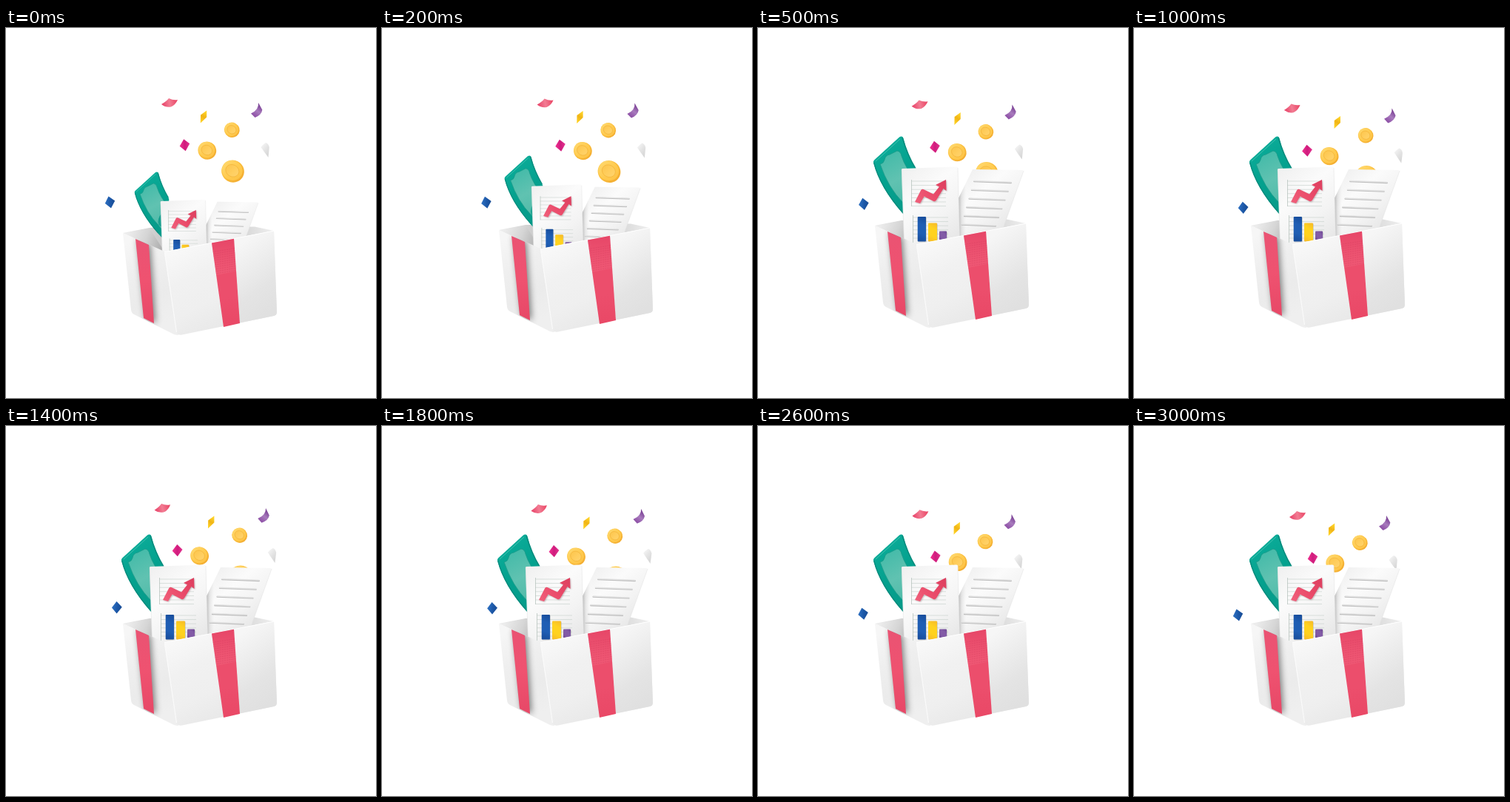
An HTML page with a canvas for the animation above (6100 ms loop, 500x500 px).

```html
<!DOCTYPE html>
<html lang="en">
<head>
<meta charset="utf-8">
<title>Gift box</title>
<style>
html, body { margin: 0; width: 100%; height: 100%; overflow: hidden; background: #fff; }
canvas { display: block; width: 100vw; height: 100vh; }
</style>
</head>
<body>
<canvas id="stage"></canvas>
<script>
const canvas = document.getElementById('stage');
const ctx = canvas.getContext('2d');
const ratio = window.devicePixelRatio || 1;
canvas.width = canvas.height = 500 * ratio;

const LOOP = 6100, STEP = 100, MOVE = 3000, HALF = 1500, POP = 500;

function grad(x0, y0, x1, y1, ...colors) {
  const g = ctx.createLinearGradient(x0, y0, x1, y1);
  colors.forEach((c, i) => g.addColorStop(i / (colors.length - 1), c));
  return g;
}

function fill(shape, style) {
  ctx.fillStyle = style;
  ctx.fill(new Path2D(shape));
}

function stroke(shape, style, width) {
  ctx.strokeStyle = style;
  ctx.lineWidth = width;
  ctx.stroke(new Path2D(shape));
}

function at(x, y, angle, draw) {
  ctx.save();
  ctx.translate(x, y);
  ctx.rotate(angle * Math.PI / 180);
  draw();
  ctx.restore();
}

function zoom(x, y, s, draw) {
  ctx.save();
  ctx.translate(x, y);
  ctx.scale(s, s);
  ctx.translate(-x, -y);
  draw();
  ctx.restore();
}

function within(shape, draw) {
  ctx.save();
  ctx.clip(new Path2D(shape));
  draw();
  ctx.restore();
}

function shadowed(color, blur, dx, dy, draw) {
  ctx.save();
  ctx.shadowColor = color;
  ctx.shadowBlur = blur * ratio;
  ctx.shadowOffsetX = dx * ratio;
  ctx.shadowOffsetY = dy * ratio;
  draw();
  ctx.restore();
}

function disc(x, y, rx, ry, style, line) {
  ctx.beginPath();
  ctx.ellipse(x, y, rx, ry, 0.5, 0, Math.PI * 2);
  ctx.fillStyle = style;
  ctx.fill();
  if (line) {
    ctx.strokeStyle = line;
    ctx.lineWidth = 0.8;
    ctx.stroke();
  }
}

function coin(r) {
  disc(0, 0, r, r * 0.96, grad(-r, -r, r, r, '#ffd25a', '#fabd3c', '#f0a62c'));
  disc(-r * 0.05, -r * 0.07, r * 0.9, r * 0.85, grad(-r, -r, r, r, '#ffdb74', '#ffcb50', '#fdbf40'));
  disc(-r * 0.04, -r * 0.05, r * 0.6, r * 0.52, grad(-r, -r, r, r, '#fabf40', '#ffce5e', '#ffd980'), '#f3b53c');
}

const pieces = [
  { x: 305.3, y: 137.8, dx: 10.5, turn: 0, draw: () => coin(10.5) },
  { x: 271.8, y: 165.6, dx: -10.3, turn: 0, draw: () => coin(12.5) },
  { x: 306.5, y: 193.6, dx: 11, turn: 0, draw: () => coin(15.5) },
  { x: 221, y: 101, dx: -9.7, turn: -4, draw() {
    fill('M-11 2Q-4-2-1-6Q5-3 11-4Q8 3 2 5.5Q-5 7-11 2Z', grad(-10, 2, 10, -2, '#e8446a', '#f27c93', '#ea4867'));
  } },
  { x: 267, y: 120, dx: 10.3, turn: 0, draw() {
    fill('M4.2-8.5L4.2 0.5L-4.2 8.5L-4-2.5Z', grad(-4, 6, 4, -6, '#ffd224', '#f0b416', '#ffd529'));
  } },
  { x: 241.2, y: 158.2, dx: -10, turn: 7, draw() {
    fill('M-1-8L7-2L1.5 8L-6.5 1.5Z', grad(-6, 0, 7, 0, '#ee2f8f', '#cf1c7d', '#e3338f'));
  } },
  { x: 338.5, y: 111, dx: 9.6, turn: 3, draw() {
    fill('M2.5-10Q3.5-0.5-7.5 4.5L-2 10Q7 6.5 7.8-0.5Z', grad(-6, 8, 5, -8, '#8a4aa3', '#a87bbd', '#74388f'));
  } },
  { x: 349.5, y: 164, dx: 9.4, turn: 2, draw() {
    fill('M1.5-9Q-3-6-5-3Q-1 3 5 11L6.3-3Q5-8 1.5-9Z', grad(-5, -4, 6, 5, '#f3f3f3', '#e4e4e4', '#d8d8d8'));
  } },
  { x: 140.5, y: 235.4, dx: 9.4, turn: 12, draw() {
    fill('M-2-8L6.7-2L1.5 8L-6.7 1.5Z', grad(-6, 0, 7, 0, '#2d6fc0', '#1c58a8', '#184b93'));
  } }
];

const wave = p => (1 - Math.cos(Math.PI * p)) / 2;

function confetti(t) {
  const out = wave(t / HALF);
  const drop = t < HALF ? 10 * out : 20 - 10 * out;
  for (const p of pieces) at(p.x + p.dx * out, p.y + drop, p.turn * out, p.draw);
}

function money() {
  fill('M156 182Q155.500 180 157 178.500L191 147.500Q195 145 196.500 149Q202 172 214 192L214 268Q204 261 196 251Q165 216 156 182Z',
    grad(160, 165, 210, 235, '#0bab98', '#04a18e', '#079b8a'));
  const inner = 'M165 184Q170 183 171 178Q172 172 178 171L188 166Q193 167 194 173Q199 189 214 207L214 250Q202 246 196 236Q176 216 165 184Z';
  fill(inner, grad(168, 170, 206, 240, '#42baa8', '#60c2b1', '#4db9a7'));
  stroke(inner, '#1a9888', 0.8);
  within(inner, () => disc(206, 226, 9, 14, '#18a08f'));
  stroke('M156.700 182Q165 215 196 250', '#078b7d', 1.3);
  stroke('M159 180L192 150', '#4fc8b7', 0.8);
  stroke('M195 148Q202 172 213 190', '#078b7d', 1.5);
}

function rows(x0, x1, y0, gap, n) {
  for (let i = 0; i < n; i++) stroke(`M${x0} ${y0 + i * gap}H${x1}`, '#cbd3cf', 0.7);
}

function bar(x, y, w, h, light, dark) {
  ctx.fillStyle = 'rgba(0,0,0,.12)';
  ctx.fillRect(x + 1, y + 1, w, h);
  ctx.fillStyle = grad(x, y + h, x + w, y, dark, light, light, dark);
  ctx.beginPath();
  ctx.roundRect(x, y, w, h, 1);
  ctx.fill();
}

function chartPage() {
  const page = 'M194 191Q194 190 196 190L268 187.500Q270 187.500 270 189L273 305L198 305Z';
  fill(page, grad(198, 195, 272, 285, '#f1f1f1', '#fbfbfb', '#f3f3f3', '#e6e6e6'));
  stroke('M194.300 191L197.700 300M270 189L272.800 300', '#e5e5e5', 0.6);

  rows(207, 254, 207, 5.6, 7);
  stroke('M207.500 205V241', '#b9c5bf', 0.8);
  shadowed('rgba(90,40,50,.3)', 2, 1, 1, () => {
    fill('M212 235L220 219.500Q221 217 223.500 218L237 224.500L245 214.500L240 212L254 205L254.500 220L250.500 217L241 232.500Q239.500 235 237 234L224.500 227.500L219 237Z',
      grad(213, 236, 254, 206, '#f0607b', '#ea4b6a', '#dd3f5f'));
  });

  rows(209, 257, 256, 5.6, 6);
  stroke('M209.500 253V290', '#b9c5bf', 0.8);
  bar(215.7, 255, 11.3, 33.5, '#1f5eb4', '#174b98');
  bar(230, 263.500, 12, 25, '#ffd21f', '#f6b92a');
  bar(245, 274.5, 10, 12, '#825ba6', '#6d4794');
}

function textPage() {
  const page = 'M290 191L357 192Q359 192 358.500 194L331 271L322 295H266V240Z';
  fill(page, grad(285, 195, 345, 265, '#f1f1f1', '#fbfbfb', '#f3f3f3', '#e6e6e6'));
  stroke('M359 193L331 271', '#e3e3e3', 0.6);
  within(page, () => {
    fill('M270 190H284V295H270Z', grad(270, 0, 281, 0, 'rgba(70,70,70,.42)', 'rgba(120,120,120,.14)', 'rgba(150,150,150,0)'));
  });
  ctx.lineCap = 'round';
  for (let i = 0; i < 6; i++) {
    const x = 292 - 3.3 * i, y = 206.5 + 11.7 * i, end = 342 - 4.2 * i;
    stroke(`M${x} ${y + 0.9}L${end} ${y + 2.700}`, '#bdbdbd', 1.9);
    stroke(`M${x} ${y}L${end} ${y + 1.8}`, '#e6e6e6', 1.5);
  }
  ctx.lineCap = 'butt';
}

function boxBack() {
  fill('M158 267L194 260L336 258.500L362 264L214 293Z', grad(158, 268, 362, 268, '#ededed', '#c9c9c9', '#c4c4c4', '#d0d0d0', '#f0f0f0'));
  fill('M160 267.500L194 260.500L214 292Z', grad(165, 265, 212, 284, '#ededed', '#d5d5d5', '#aeaeae'));
}

function boxFront() {
  const left = 'M158 267L214 292L233 405Q230 405 227 404L173 377Q169.500 375 169 371Z';
  const front = 'M214 292.500L362 264L366 374Q366 378 362 379L238 404.500Q232 405.500 230 401Z';

  fill(left, grad(165, 280, 222, 385, '#f6f6f6', '#efefef', '#ebebeb', '#efefef'));
  within(left, () => {
    shadowed('rgba(50,50,50,.6)', 9, 2.500, 0, () => {
      fill('M175 275L193 283L200 389L186 382Z', grad(178, 276, 195, 388, '#ea5373', '#ef5270', '#e74867'));
    });
  });

  fill(front, grad(222, 295, 275, 405, '#f8f8f8', '#f1f1f1', '#efefef', '#e8e8e8'));
  within(front, () => {
    fill('M306 270L370 260V385L316 392Z', grad(312, 285, 368, 365, '#f6f6f6', '#ededed', '#e4e4e4', '#e0e0e0'));
  });
  stroke('M214.500 294L230.500 401', '#fbfbfb', 1.1);
  stroke('M214 292.700L362 264.200', '#fff', 1);

  const ribbon = 'M278 280.500L308 274.700L316 389L294 394Z';
  fill(ribbon, grad(290, 276, 300, 394, '#ea4d6c', '#ec4e6c', '#ec4e6c', '#e94866'));
  within(ribbon, () => {
    fill('M270 270H318V317L270 327Z', grad(0, 276, 0, 324, 'rgba(220,50,90,.25)', 'rgba(255,140,160,.16)'));
    ctx.setLineDash([2, 1.2]);
    for (let y = 291; y < 322; y += 3) stroke(`M276 ${y + 2}L314 ${y - 4}`, 'rgba(205,55,90,.4)', 0.8);
    ctx.setLineDash([]);
  });
}

function render(t) {
  const rest = Math.pow(Math.max(0, 1 - t / POP), 1.2);
  const size = 1 - 0.2 * rest;
  const sink = 10 * Math.max(0, 1 - t / POP);

  ctx.setTransform(ratio, 0, 0, ratio, 0, 0);
  ctx.fillStyle = '#fff';
  ctx.fillRect(0, 0, 500, 500);
  confetti(t);
  at(0, sink, 0, boxBack);
  zoom(245, 386, size, money);
  zoom(268, 410, size, () => {
    textPage();
    chartPage();
  });
  at(0, sink, 0, boxFront);
}

const start = performance.now();

function tick() {
  const t = (performance.now() - start) % LOOP;
  render(Math.min(Math.floor(t / STEP) * STEP, MOVE));
  requestAnimationFrame(tick);
}
tick();
</script>
</body>
</html>
```
